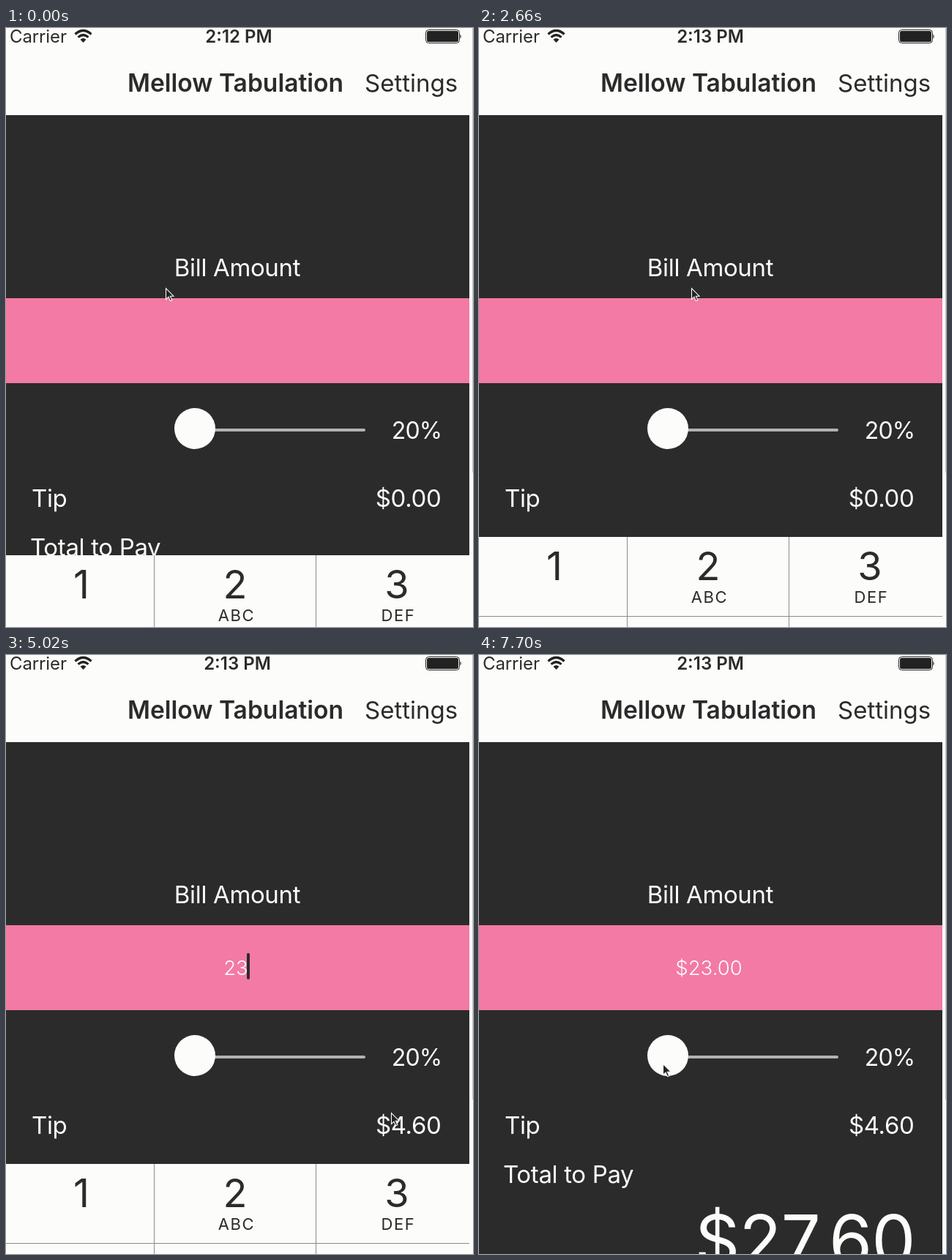
An HTML page that plays this animation: 638x818 px, repeating every 7.99 s.

```html
<!DOCTYPE html>
<html lang="en">
<head>
<meta charset="utf-8">
<title>Tip calculator</title>
<style>
  html, body { margin: 0; width: 100%; height: 100%; overflow: hidden; background: #fcfcfa; }
  svg { display: block; width: 638px; height: 818px; }
  text { font-family: Inter, Roboto, sans-serif; fill: #fcfcfa; white-space: pre; }
  .ink text { fill: #2b2b2b; }
  .label text { font-size: 33px; letter-spacing: -.35px; }
  .label .rate { font-size: 32px; letter-spacing: -.8px; }
  .status { font-size: 24px; }
  .bar { font-size: 33px; }
  .title { font-size: 33.6px; }
  .bold { font-weight: 600; }
  .mid { text-anchor: middle; }
  .end { text-anchor: end; }
  .digit { font-size: 54px; }
  .letters { font-size: 22px; letter-spacing: 1.6px; }
  #bill { font-size: 27.5px; font-weight: 300; }
  #total { font-size: 95.6px; letter-spacing: -1px; }
</style>
</head>
<body>
<svg viewBox="0 0 638 818">
  <rect width="638" height="818" fill="#fcfcfa"/>
  <rect y="119" width="633" height="699" fill="#2b2b2b"/>
  <rect y="369" width="633" height="116" fill="#f27aa5"/>
  <path d="M637.5 0V607" stroke="#c6c7c5"/>

  <g class="ink">
    <text class="status" x="5" y="20" letter-spacing="-.1">Carrier</text>
    <text class="status bold mid" id="clock" y="20"></text>
    <text class="title bold mid" x="313.5" y="87">Mellow Tabulation</text>
    <text class="bar" x="490" y="87">Settings</text>
  </g>
  <g fill="none" stroke="#222" stroke-width="3.2">
    <path d="M94.5 8.5Q105.5-1.5 116.5 8.5M98.5 12.6Q105.5 6.4 112.5 12.6"/>
    <path d="M105.5 20L101.5 15.8Q105.5 12.4 109.5 15.8Z" fill="#222" stroke="none"/>
  </g>
  <rect x="573.5" y="2.5" width="46" height="18" rx="4" fill="none" stroke="#222"/>
  <rect x="575" y="4" width="43" height="15" rx="2.5" fill="#222"/>
  <path d="M620.5 8.5Q623 11.5 620.5 14.5Z" fill="#222"/>

  <path d="M258 549H489" stroke="#b1b3b1" stroke-width="4" stroke-linecap="round"/>
  <circle cx="258" cy="547" r="28" fill="#fcfcfa"/>

  <g class="label">
    <text class="mid" x="316" y="339">Bill Amount</text>
    <text class="rate end" x="595.5" y="561">20%</text>
    <text x="35" y="653.5">Tip</text>
    <text class="end" id="tip" x="594.5" y="653.5"></text>
    <text x="33" y="721">Total to Pay</text>
  </g>
  <text class="end" id="total" x="595.5" y="834"></text>

  <text class="mid" id="bill" x="314" y="436.5"></text>
  <rect id="caret" y="407" width="4" height="36" rx="2" fill="#2b2b2b"/>

  <g id="pad" class="ink">
    <rect width="633" height="130" fill="#fcfcfa"/>
    <path d="M202.5 0V130M423.5 0V130M0 108.5H633" fill="none" stroke="#8c8c8c"/>
    <text class="digit mid" x="103" y="59">1</text>
    <text class="digit mid" x="313" y="59">2</text>
    <text class="digit mid" x="534" y="59">3</text>
    <text class="letters mid" x="315" y="90">ABC</text>
    <text class="letters mid" x="536" y="90">DEF</text>
  </g>

  <path id="pointer" d="M.5.5V15.5L4 12.2L6.4 17.6L8.8 16.6L6.4 11.2H11Z" fill="#222" stroke="#fcfcfa" stroke-width="1.1"/>
</svg>
<script>
  // The screen refreshes in steps; all times below count steps.
  const LOOP = 7990, STEPS = 54;
  const BLINK = 6.5, CLOCK_TURN = 12, DISMISS = 43;

  const entries = [
    { from: -5.9, text: "", amount: 0 },
    { from: 28, text: "2", amount: 2 },
    { from: 32, text: "23", amount: 23 },
    { from: DISMISS, text: "$23.00", amount: 23 }
  ];

  // Pointer stops: field, key 2, key 3, rest, slider.
  const stops = [
    [0, 218, 355], [4, 290, 355], [23, 290, 355], [27, 214, 771], [29, 418, 725],
    [31, 540, 766], [33, 538, 766], [36, 492, 223], [38, 492, 223], [40, 492, 229],
    [45, 492, 229], [50, 236, 620], [52, 251, 558]
  ];

  const $ = id => document.getElementById(id);
  const clamp = v => Math.min(1, Math.max(0, v));
  const ease = p => p * p * (3 - 2 * p);
  const money = n => "$" + n.toFixed(2);

  function pointerAt(n) {
    const i = Math.max(1, stops.findIndex(s => s[0] >= n));
    if (n >= stops.at(-1)[0]) return stops.at(-1).slice(1);
    const [t0, x0, y0] = stops[i - 1], [t1, x1, y1] = stops[i];
    const p = ease((n - t0) / (t1 - t0));
    return [x0 + (x1 - x0) * p, y0 + (y1 - y0) * p];
  }

  // Blinking restarts with each key press.
  const caretAlpha = age => clamp(.5 + 1.7 * Math.cos(2 * Math.PI * (age - 2.2) / BLINK));

  const padTop = n => n < DISMISS ? Math.round(695 + 25 * .44 ** n) : 818;

  function place(id, x, y) {
    $(id).setAttribute("transform", `translate(${x} ${y})`);
  }

  function draw(t) {
    const n = Math.min(STEPS - 1, Math.floor(t * STEPS / LOOP + .07));
    const entry = entries.findLast(e => e.from <= n);
    const late = n >= CLOCK_TURN;

    place("pointer", ...pointerAt(n).map(Math.round));
    place("pad", 0, padTop(n));
    place("caret", 312 + 8.5 * entry.text.length, 0);
    $("caret").setAttribute("opacity", n < DISMISS ? caretAlpha(n - entry.from) : 0);
    $("clock").setAttribute("x", late ? 316 : 318);
    $("clock").textContent = late ? "2:13 PM" : "2:12 PM";
    $("bill").textContent = entry.text;
    $("tip").textContent = money(entry.amount * .2);
    $("total").textContent = money(entry.amount * 1.2);
  }

  const start = performance.now();
  function tick() {
    draw((performance.now() - start) % LOOP);
    requestAnimationFrame(tick);
  }
  tick();
</script>
</body>
</html>
```
